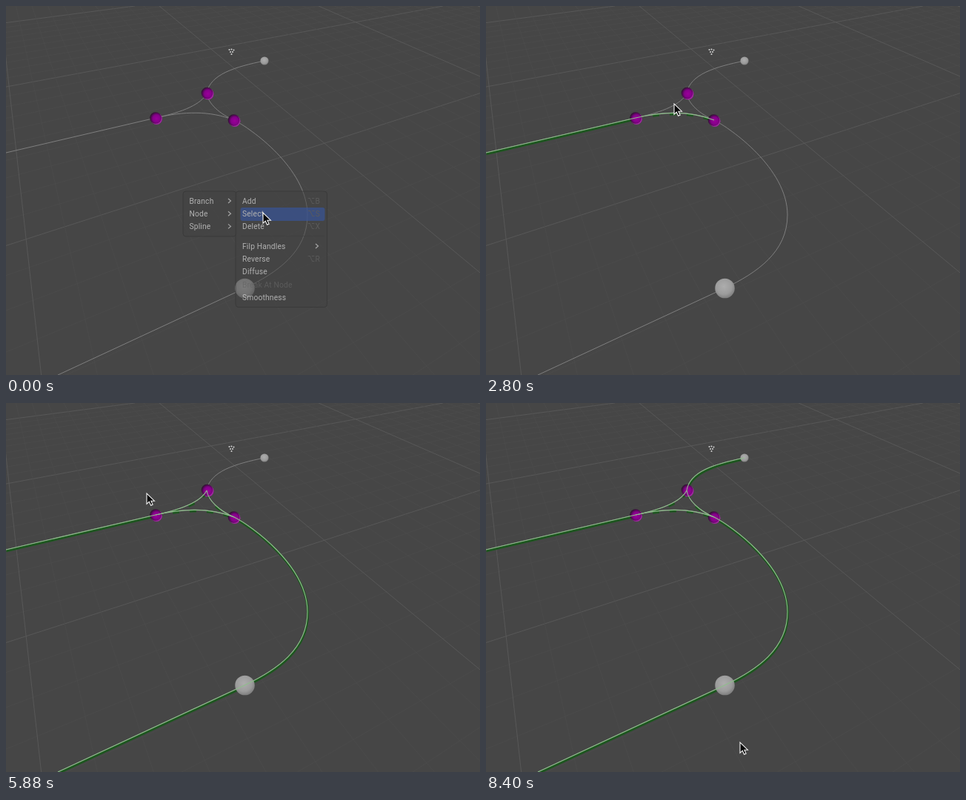
These frames come from a looping animation (640 by 498 pixels, 8.47 s). An HTML page:

```html
<!DOCTYPE html>
<html lang="en">
<head>
<meta charset="utf-8">
<title>Selecting branches</title>
<style>
html, body { margin: 0; width: 100%; height: 100%; overflow: hidden; background: #464646; }
svg { display: block; width: 640px; height: 498px; }
text { font: 10.3px Roboto, Inter, sans-serif; letter-spacing: .15px; fill: #c4c4c4; }
.dim { fill: #5f5f5f; }
.line { fill: none; stroke: #858585; stroke-width: .9; }
.shade { fill: none; stroke: #1d561f; stroke-width: 3; }
.glow { fill: none; stroke: #8fbd8c; stroke-width: 1.1; }
.panel { fill: #434343; fill-opacity: .55; stroke: #383838; }
</style>
</head>
<body>
<svg viewBox="0 0 640 498">
  <defs>
    <radialGradient id="pink" cx=".58" cy=".56" r=".58">
      <stop offset="0" stop-color="#9a0099"/>
      <stop offset=".55" stop-color="#85008a"/>
      <stop offset="1" stop-color="#2c122d"/>
    </radialGradient>
    <radialGradient id="grey" cx=".45" cy=".4" r=".62">
      <stop offset="0" stop-color="#adadad"/>
      <stop offset=".65" stop-color="#9c9c9c"/>
      <stop offset="1" stop-color="#7c7c7c"/>
    </radialGradient>
  </defs>
  <g id="grid"></g>
  <g id="lines"></g>
  <g id="shades"></g>
  <g id="nodes"></g>
  <g id="glows"></g>
  <rect id="box" x="143" y="100" fill="#000" fill-opacity=".17" stroke="#3c3c3c" stroke-width=".8"/>
  <g id="menu">
    <rect class="panel" x="239" y="250" width="72" height="61" rx="4"/>
    <rect class="panel" x="310" y="250" width="123.500" height="156.500" rx="4"/>
    <rect x="316.500" y="272" width="114" height="18" rx="3" fill="#3a5189"/>
    <path d="M317 310.500H430" stroke="#404040"/>
  </g>
  <g id="pointer">
    <g id="ring" fill="none">
      <circle id="halo" cx="1" cy="1" r="18.300" stroke-width="4.200"/>
      <circle id="rim" cx="1" cy="1" r="18.300" stroke-width="1.700"/>
    </g>
    <path d="M0 0V14.200L3.300 11.200L5.600 16.200L8.100 15.100L5.900 10.200H10.400Z" fill="#080808" stroke="#f2f2f2" stroke-width="1.100"/>
  </g>
</svg>
<script>
const LOOP = 8470, STEP = 70;
const $ = id => document.getElementById(id);

function add(parent, tag, attrs, text) {
  const el = document.createElementNS('http://www.w3.org/2000/svg', tag);
  for (const key in attrs) el.setAttribute(key, attrs[key]);
  if (text) el.textContent = text;
  return $(parent).appendChild(el);
}

// Perspective floor: each family of lines meets at a vanishing point.
function floorLines(vx, vy, first, gap, from, to) {
  for (let k = from; k <= to; k++) {
    const x = first + gap * k, major = k % 10 === 0;
    add('grid', 'line', {
      x1: x, y1: 0, x2: vx + (x - vx) * 12, y2: vy - vy * 12,
      stroke: major ? '#5a5a5a' : '#4c4c4c', 'stroke-width': major ? .9 : .8
    });
  }
}
floorLines(1569, -181, 590, 41.6, -10, 20);
floorLines(-30, -197, 207, 21.5, -14, 20);

// Each branch is lit in the listed time spans.
const branches = [
  ['M0 198L202 151', 1260],
  ['M202 151C240 142 275 141 308 154', 2240],
  ['M202 151C240 143 264 132 271 118', 3080],
  ['M271 118C273 132 289 146 308 154', 3780],
  ['M308 154C330 165 407 219 407 282C407 332 366 360 322 381L70 498', 4690],
  ['M271 118C275 92 310 82 349 74', LOOP]
].map(([d, start], i) => {
  add('lines', 'path', { d, class: 'line' });
  const shade = add('shades', 'path', { d, class: 'shade', transform: 'translate(.5 1.8)' });
  if (i > 0 && i < 4) shade.setAttribute('stroke-dasharray', '9 14');
  return { start, parts: [shade, add('glows', 'path', { d, class: 'glow' })] };
});

for (const [x, y] of [[202, 151], [271.5, 117.5], [307.5, 154]]) {
  add('nodes', 'circle', { cx: x + 1.3, cy: y + 1.3, r: 7.7, fill: '#a127a1' });
  add('nodes', 'circle', { cx: x, cy: y, r: 7.8, fill: 'url(#pink)' });
}
add('nodes', 'circle', { cx: 349, cy: 74, r: 5.6, fill: 'url(#grey)' });
add('nodes', 'circle', { cx: 322.5, cy: 381, r: 13.3, fill: 'url(#grey)' });
for (const [x, y] of [[301.5, 59], [304.5, 58.5], [307.5, 59.5], [303, 62], [306, 62], [304.5, 65]])
  add('nodes', 'circle', { cx: x, cy: y, r: 1, fill: '#d5d5d5' });

const chevron = (x, y) => add('menu', 'path',
  { d: `M${x} ${y - 3}l3.500 3l-3.500 3`, fill: 'none', stroke: '#b5b5b5', 'stroke-width': 1.2 });
['Branch', 'Node', 'Spline'].forEach((label, i) => {
  add('menu', 'text', { x: 247.5, y: 266.5 + i * 17.2 }, label);
  chevron(300, 263 + i * 17.2);
});
[['Add', 266.5, '⌥B'], ['Select', 283.7, '⌥S'], ['Delete', 301, '⌥X'], ['Filp Handles', 327.7],
 ['Reverse', 345, '⌥R'], ['Diffuse', 362], ['Break At Node', 379.5], ['Smoothness', 396.7]]
  .forEach(([label, y, hint]) => {
    add('menu', 'text', { x: 319, y, class: label === 'Break At Node' ? 'dim' : '' }, label);
    if (hint) add('menu', 'text', { x: 424, y, class: 'dim', 'text-anchor': 'end' }, hint);
  });
chevron(418, 324);

// Pointer path: time, x, y
const track = [
  [0, 347, 279], [70, 347, 279], [350, 285, 205], [630, 185, 125], [910, 124, 165],
  [1540, 125, 166], [1820, 238, 138], [1960, 250, 148], [2380, 250, 148], [2660, 254, 132],
  [3080, 254, 132], [3430, 285, 135], [4060, 285, 136], [4340, 341, 183], [4900, 341, 183],
  [5600, 190, 122], [5880, 190, 122], [6160, 143, 100], [6600, 143, 100], [6860, 282, 167],
  [7140, 342, 197], [7980, 342, 197], [8330, 343, 458], [LOOP, 343, 458]
];
const presses = [[1050, 1260], [2030, 2240], [2870, 3080], [3570, 3780], [4480, 4690], [6370, 7560]];
const [dragStart, dragEnd] = presses[5];

function pointerAt(t) {
  const i = track.findIndex(key => key[0] > t);
  const [t0, x0, y0] = track[i - 1], [t1, x1, y1] = track[i];
  const u = (t - t0) / (t1 - t0);
  const e = t > dragStart && t < dragEnd ? u : u * u * (3 - 2 * u);
  return [x0 + (x1 - x0) * e, y0 + (y1 - y0) * e];
}
const show = (el, on) => el.setAttribute('visibility', on ? 'visible' : 'hidden');

function draw(t) {
  const [x, y] = pointerAt(t);
  $('pointer').setAttribute('transform', `translate(${x} ${y})`);

  const dragging = t >= dragStart && t < dragEnd;
  show($('ring'), presses.some(([from, to]) => t >= from && t < to));
  $('halo').setAttribute('stroke', dragging ? '#252525' : '#4653a8');
  $('rim').setAttribute('stroke', dragging ? '#dedede' : '#e2e2f2');

  const [bx, by] = pointerAt(Math.max(0, t - 17));
  show($('box'), dragging);
  $('box').setAttribute('width', Math.max(0, bx - 143));
  $('box').setAttribute('height', Math.max(0, by - 100));

  $('menu').setAttribute('opacity', Math.max(0, .85 * (1 - t / 280)));
  for (const { start, parts } of branches) {
    const lit = t >= dragEnd || (t >= start && t < dragStart);
    for (const part of parts) show(part, lit);
  }
}

function tick(now) {
  draw(Math.floor((now % LOOP) / STEP) * STEP);
  requestAnimationFrame(tick);
}
draw(0);
requestAnimationFrame(tick);
</script>
</body>
</html>
```
